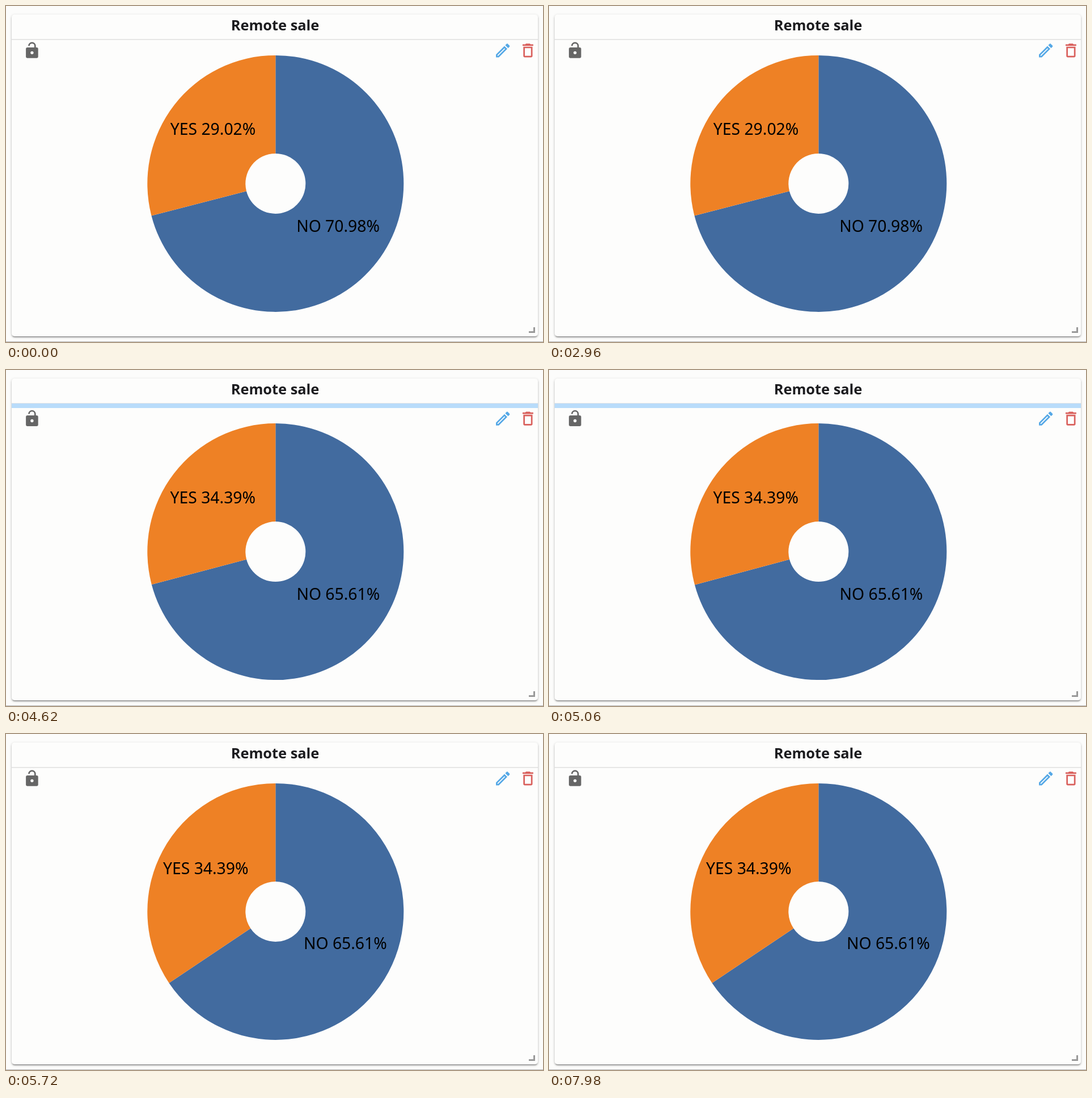
Recreate the animation shown at these times as an HTML page. Size 947 by 592 pixels, loop 8000 ms.

```html
<!DOCTYPE html>
<html lang="en">
<head>
<meta charset="utf-8">
<title>Remote sale</title>
<style>
  html, body { margin: 0; width: 100%; height: 100%; overflow: hidden; background: #fcfcfb; }
  body { position: relative; }
  .card {
    position: absolute; left: 10px; top: 15px; width: 928px; height: 567px;
    border-radius: 5px; background: #fdfdfc;
    box-shadow: 0 3px 2px -2px #0005, 0 2px 3px #0003, 0 1px 5px #0002;
  }
  svg { position: absolute; left: 0; top: 0; display: block; }
  text { font-family: "Noto Sans", "Open Sans", sans-serif; text-anchor: middle; }
  .title { font-size: 25.4px; font-weight: 700; fill: #1c1c1f; }
  .label { font-size: 28.3px; fill: #000; }
</style>
</head>
<body>
<div class="card"></div>
<svg width="947" height="592" viewBox="0 0 947 592">
  <text class="title" x="474.5" y="43">Remote sale</text>
  <path d="M10 59H938" stroke="#d0d0d0"/>
  <path d="M0 591.5H947" stroke="#b4b4b4"/>
  <g id="loader">
    <rect x="10" y="59" width="928" height="8" fill="#b9dcfa"/>
    <rect id="progress" x="10" y="60" height="7" fill="#2190ee"/>
  </g>
  <g id="content">
    <path fill="#666" fill-rule="evenodd" transform="translate(29.7 62.1) scale(1.35)"
      d="M18 8a2 2 0 0 1 2 2v10a2 2 0 0 1-2 2H6a2 2 0 0 1-2-2V10a2 2 0 0 1 2-2h9V6a3 3 0 0 0-6 0H7a5 5 0 0 1 10 0v2zM12 17a2 2 0 0 0 0-4 2 2 0 0 0 0 4z"/>
    <path fill="#55a8e6" transform="translate(860 62.2) scale(1.35)"
      d="M14.06 9.02l.92.92L5.92 19H5v-.92l9.06-9.06M17.66 3c-.25 0-.51.1-.7.29l-1.83 1.83 3.75 3.75 1.83-1.83c.39-.39.39-1.04 0-1.41l-2.34-2.34c-.2-.2-.45-.29-.71-.29m-3.6 3.19L3 17.25V21h3.75L17.81 9.94z"/>
    <path fill="#d9605c" fill-rule="evenodd" transform="translate(904.2 62.2) scale(1.35)"
      d="M6 19a2 2 0 0 0 2 2h8a2 2 0 0 0 2-2V7H6zM8 9h8v10H8zM15.5 4l-1-1h-5l-1 1H5v2h14V4z"/>
    <g transform="translate(475.3 312.9)">
      <path id="noSlice" fill="#426b9f"/>
      <path id="yesSlice" fill="#ee8125"/>
      <text id="noLabel" class="label"></text>
      <text id="yesLabel" class="label"></text>
    </g>
  </g>
  <path d="M922 574.5H931.5V566" fill="none" stroke="#999" stroke-width="3"/>
</svg>
<script>
  const LOOP = 8000, OUTER = 226, INNER = 53;
  const LOAD_START = 4580, TWEEN_START = 5467, LOAD_END = 5700, TWEEN = 250;
  const BEFORE = 0.7098, AFTER = 0.6561;
  const el = id => document.getElementById(id);

  const cubicInOut = x => x < 0.5 ? 4 * x ** 3 : 1 - 4 * (1 - x) ** 3;
  const polar = (turn, r) => {
    const a = turn * 2 * Math.PI;
    return [(r * Math.sin(a)).toFixed(2), (-r * Math.cos(a)).toFixed(2)];
  };

  function slice(from, to) {
    const large = to - from > 0.5 ? 1 : 0;
    return `M${polar(from, OUTER)}A${OUTER} ${OUTER} 0 ${large} 1 ${polar(to, OUTER)}` +
      `L${polar(to, INNER)}A${INNER} ${INNER} 0 ${large} 0 ${polar(from, INNER)}Z`;
  }

  function drawSlice(name, from, to, share) {
    el(name + 'Slice').setAttribute('d', slice(from, to));
    const label = el(name + 'Label');
    const [x, y] = polar((from + to) / 2, (OUTER + INNER) / 2);
    label.setAttribute('x', x);
    label.setAttribute('y', y);
    label.textContent = `${name.toUpperCase()} ${(share * 100).toFixed(2)}%`;
  }

  // The update starts, stalls while data loads, then runs to its end.
  function tweenAt(t) {
    if (t < LOAD_START) return 0;
    const stalled = cubicInOut(Math.min(t - LOAD_START, 47) / TWEEN);
    const x = Math.min(Math.max((t - TWEEN_START) / TWEEN, 0), 1);
    return Math.max(stalled, cubicInOut(x));
  }

  function draw(t) {
    const loading = t >= LOAD_START && t < LOAD_END;
    const edge = BEFORE + (AFTER - BEFORE) * tweenAt(t);
    const share = t < LOAD_START ? BEFORE : AFTER;
    drawSlice('no', 0, edge, share);
    drawSlice('yes', edge, 1, 1 - share);
    el('content').setAttribute('transform', `translate(0 ${loading ? 7.2 : 0})`);
    el('loader').setAttribute('visibility', loading ? 'visible' : 'hidden');
    const run = Math.max(t - TWEEN_START, 0) / 113;
    el('progress').setAttribute('width', loading ? 62 * run ** 1.7 : 0);
  }

  function frame() {
    draw(performance.now() % LOOP);
    requestAnimationFrame(frame);
  }
  frame();
</script>
</body>
</html>
```
